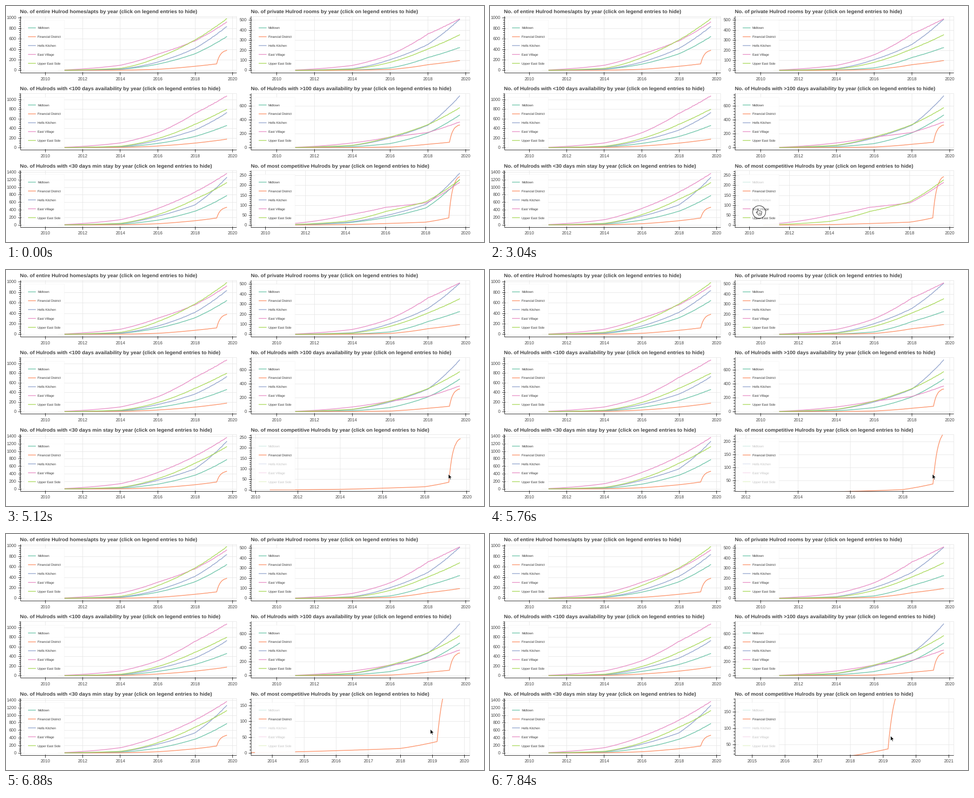
Animation, 1062 px wide and 527 px high, one loop 8 s. Source, as a matplotlib script:

```python
import numpy as np
import matplotlib.pyplot as plt
from matplotlib.animation import FuncAnimation
from matplotlib.collections import LineCollection
from matplotlib.patches import Circle, Polygon, Rectangle

W, H = 1062, 527
STEP, FRAMES = 160, 50
plt.rcParams.update({"font.family": "Liberation Sans", "path.snap": False,
                     "text.hinting": "no_hinting"})
INK, GRID = "#444444", "#e5e5e5"
AREAS = ["Midtown", "Financial District", "Hells Kitchen",
         "East Village", "Upper East Side"]
COLORS = ["#66c2a5", "#fc8d62", "#8da0cb", "#e78ac3", "#a6d854"]
EARLY_SHARE = [0.17, 0.2, 0.16, 0.32, 0.16]  # count in 2014 relative to 2016
DISTRICT = 1
SURGE_START = 2019.15
DATES = np.linspace(2010.7, 2019.68, 220)

fig = plt.figure(figsize=(W / 72, H / 72), dpi=72, facecolor="white")
ax = fig.add_axes([0, 0, 1, 1])
ax.set_xlim(0, W)
ax.set_ylim(H, 0)
ax.axis("off")


def grow(seed, rows, early=1, surge=0):
    """Curves from the counts in 2016, in 2018 and at the end.

    The square root of a count rises evenly between those dates; the
    Financial District gets a late surge that levels off.
    """
    rng = np.random.default_rng(seed)
    curves = []
    for i, (mid, late, end) in enumerate(rows):
        first = EARLY_SHARE[i] * early * mid
        roots = np.sqrt([0.06 * first, first, mid, late, end])
        counts = np.interp(DATES, [2010.7, 2014, 2016, 2018, 2019.68], roots) ** 2
        if i == DISTRICT:
            since = np.clip(DATES - SURGE_START, 0, None)
            counts += surge * (1 - np.exp(-since / 0.17))
        uneven = counts * rng.uniform(0.992, 1.006, len(DATES))
        curves.append(np.maximum.accumulate(uneven))
    return curves


def crisp(v):
    return np.floor(v) + 0.5


def label(x, y, text, size, **style):
    return ax.text(x, y, text, fontsize=size, va="baseline", zorder=6,
                   **{"color": INK, **style})


def segments(lines, color, width, z):
    return ax.add_collection(
        LineCollection(lines, colors=color, linewidths=width, zorder=z))


def draw_legend(left, top, hidden):
    box = Rectangle((left + 8.6, top + 8.6), 89.2, 114, fc=(1, 1, 1, 0.95),
                    ec=(0.9, 0.9, 0.9, 0.4), lw=0.8, zorder=4)
    parts = [ax.add_patch(box)]
    for i, (area, color) in enumerate(zip(AREAS, COLORS)):
        y = top + 25.8 + 19.8 * i
        fade = 0.3 if i in hidden else 1
        parts += ax.plot([left + 17, left + 34.3], [y, y], color=color, lw=1.7,
                         alpha=0.88 * fade, zorder=5, solid_capstyle="butt")
        parts.append(label(left + 38.4, y + 2.5, area, 7, alpha=fade,
                           color="#333333"))
    return parts


def draw_panel(col, row, subject, view, step, curves, hidden=()):
    """view = pixels per year, x of 2018, pixels per count, y of zero."""
    sx, x18, sy, zero = view
    left, right = [(32, 512.5), (544.5, 1030.5)][col]
    top = 23 + 172.3 * row
    bottom = top + 126.6
    axis_x, axis_y = crisp(left), crisp(bottom)
    frame = ax.add_patch(Rectangle((axis_x, crisp(top)), right - axis_x,
                                   axis_y - crisp(top), fc="none", ec=GRID,
                                   lw=0.9, zorder=1))
    title = f"No. of {subject} by year (click on legend entries to hide)"
    parts = [frame, label(left - 0.6, top - 6.2, title, 11.46, weight="bold")]
    grid = []
    ticks = [[(axis_x, top), (axis_x, axis_y)],
             [(axis_x, axis_y), (right, axis_y)]]

    for year in range(2000, 2030, 1 if sx > 60 else 2):
        x = x18 + (year - 2018) * sx
        if left <= x <= right:
            xc = crisp(x)
            grid.append([(xc, top), (xc, bottom)])
            ticks.append([(xc, axis_y - 1.7), (xc, axis_y + 5.2)])
            parts.append(label(x, bottom + 16.9, str(year), 9.8, ha="center"))

    for k in range(60):
        y = zero - k * step / 5 * sy
        if not top <= y <= bottom:
            continue
        yc, major = crisp(y), k % 5 == 0
        ticks.append([(axis_x - (5.2 if major else 3.4), yc),
                      (axis_x + (1.7 if major else 0), yc)])
        if major:
            grid.append([(left, yc), (right, yc)])
            parts.append(label(left - 9.4, y + 3.5, str(k * step // 5), 9.8,
                               ha="right"))

    parts += [segments(grid, GRID, 0.9, 1), segments(ticks, "black", 0.9, 3)]
    for i, counts in enumerate(curves):
        if i not in hidden:
            line, = ax.plot(x18 + (DATES - 2018) * sx, zero - counts * sy,
                            color=COLORS[i], lw=1.7, alpha=0.88, zorder=2)
            line.set_clip_path(frame)
            parts.append(line)
    return parts + draw_legend(left, top, hidden)


def draw_static(col, row, subject, sy, step, curves):
    sx, x18 = [(41.6, 420.3), (42, 937.1)][col]
    draw_panel(col, row, subject, (sx, x18, sy, 143.9 + 172.6 * row), step, curves)


draw_static(0, 0, "entire Hulrod homes/apts", 0.117, 200, grow(
    1, [(120, 320, 645), (22, 80, 150), (160, 425, 838),
        (310, 568, 922), (245, 585, 985)], surge=245))
draw_static(1, 0, "private Hulrod rooms", 0.2245, 100, grow(
    2, [(25, 128, 228), (10, 57, 98), (107, 258, 509),
        (155, 362, 513), (80, 214, 354)]))
draw_static(0, 1, "Hulrods with <100 days availability", 0.1075, 200, grow(
    3, [(90, 235, 462), (35, 97, 178), (150, 370, 725),
        (310, 718, 1075), (190, 490, 800)]))
draw_static(1, 1, "Hulrods with >100 days availability", 0.155, 200, grow(
    4, [(60, 213, 470), (10, 50, 95), (140, 325, 745),
        (153, 220, 372), (155, 332, 575)], early=1.4, surge=245))
draw_static(0, 2, "Hulrods with <30 days min stay", 0.084, 200, grow(
    5, [(130, 370, 780), (35, 115, 225), (235, 540, 1265),
        (440, 880, 1370), (275, 690, 1120)], surge=260))
competitive = grow(
    6, [(38, 87, 230), (8, 15, 50), (48, 105, 262),
        (90, 112, 216), (69, 118, 228)], early=1.7, surge=205)

# Legend rows in the order they are clicked, with the time of the click
CLICKS = {0: 1760, 2: 2400, 3: 3040, 4: 3680}
DRAGS = [(6240, 6720), (7200, 7840)]

# time, x, y of the pointer's middle
PATH = np.array(
    [(160, 712, 520), (1120, 589, 403)]
    + [(t + hold, 589 + 3 * row, 402 + 19.4 * row)
       for row, t in CLICKS.items() for hold in (0, STEP)]
    + [(4640, 986.5, 462), (6080, 986.5, 462), (6400, 929.5, 428),
       (7040, 952, 447), (7360, 932.5, 454.5), (7840, 893.5, 457)])

# time, zoom, x of 2018, y of zero
VIEW = np.array([
    (4800, 1, 932.7, 489.3), (5120, 1.056, 930, 491), (5440, 1.056, 930, 491),
    (6080, 1.56, 904.7, 507), (6400, 1.56, 894, 490.2),
    (7360, 1.637, 858.2, 488.7), (7840, 1.637, 800.8, 506.4)])

ARROW = np.array([(0, 0), (0, 11), (2.6, 8.7), (4.3, 12.6), (6, 11.8),
                  (4.3, 8), (7.8, 8)]) - (3.5, 6.3)
HAND = np.array([(-4, -6), (-2.6, -7), (-1.4, -6), (-1, -2.5), (1, -3),
                 (3, -2.3), (5, -1.5), (6, -0.3), (5.6, 3), (4.3, 6.8),
                 (-1.5, 6.8), (-4, 3.5), (-6.5, 0.5), (-5.5, -0.8), (-3.6, 0.8)])


def at(keys, t):
    return [np.interp(t, keys[:, 0], column) for column in keys[:, 1:].T]


def draw_cursor(t):
    if t < PATH[0, 0]:
        return []
    x, y = at(PATH, t)
    parts = []
    presses = [(start, start + STEP) for start in CLICKS.values()] + DRAGS
    if any(start <= t < end for start, end in presses):
        parts.append(ax.add_patch(Circle((x, y), 14.3, fc=(1, 1, 1, 0.35),
                                         ec="black", lw=0.9, zorder=8)))
    if 553 < x < 642 and 376 < y < 489:
        parts.append(ax.add_patch(Polygon(HAND + (x, y), fc="white",
                                          ec="black", lw=0.8, zorder=9)))
        folds = [[(x + d, y + 1), (x + d, y + 4.6)] for d in (-0.4, 1.6, 3.6)]
        parts.append(segments(folds, "black", 0.6, 10))
    else:
        parts.append(ax.add_patch(Polygon(ARROW + (x, y), fc="black",
                                          ec="white", lw=0.8, zorder=9)))
    return parts


live = []


def update(i):
    t = i * STEP
    for part in live:
        part.remove()
    hidden = [row for row, click in CLICKS.items() if t > click]
    zoom, x18, zero = at(VIEW, t)
    view = (44.5 * zoom, x18, 0.442 * zoom, zero)
    live[:] = draw_panel(1, 2, "most competitive Hulrods", view, 50,
                         competitive, hidden)
    live.extend(draw_cursor(t))
    return live


anim = FuncAnimation(fig, update, frames=FRAMES, interval=STEP,
                     init_func=lambda: live, repeat=True, repeat_delay=0,
                     blit=False)
plt.show()
```
